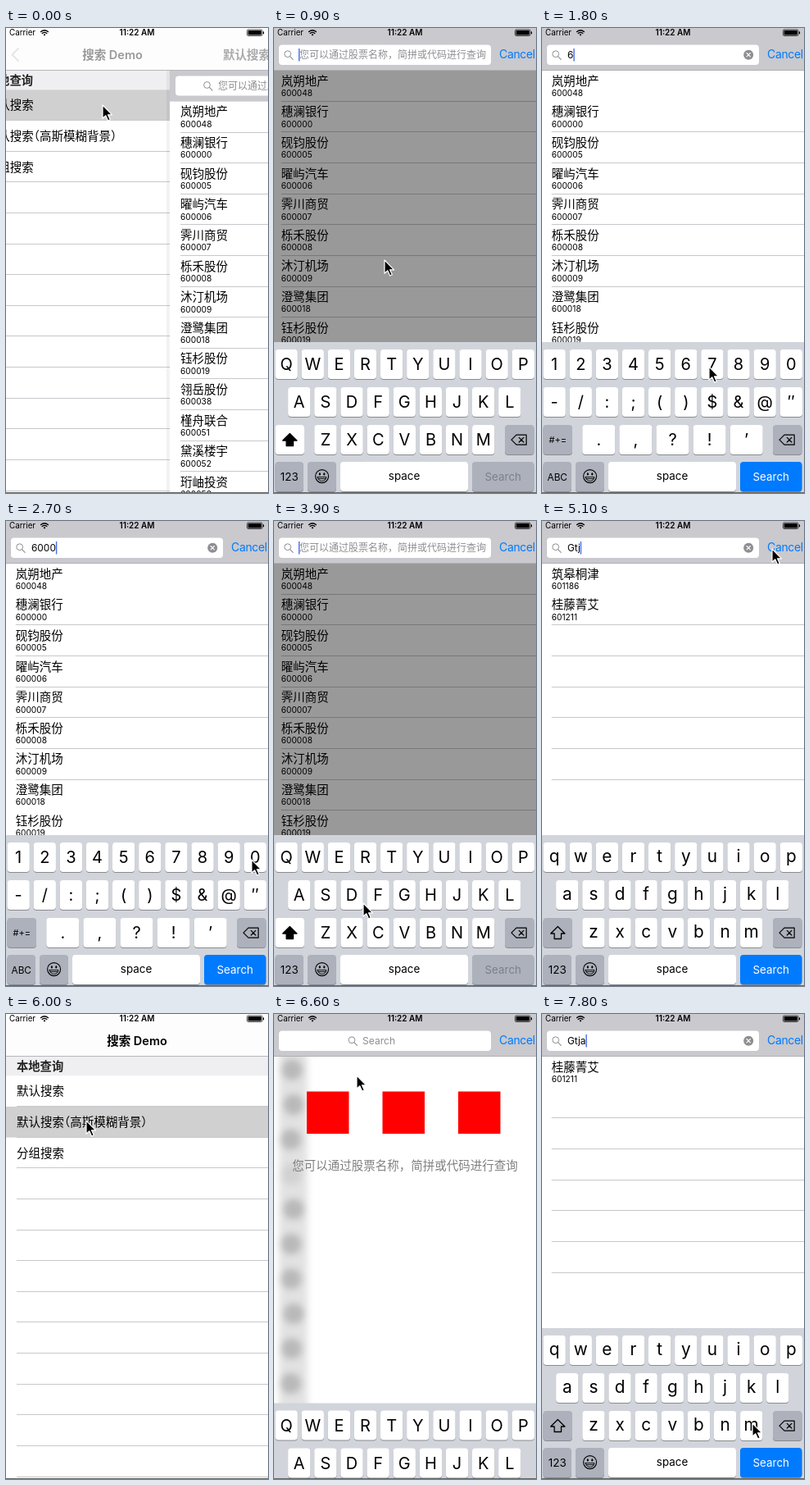
An HTML page for the animation above (8000 ms loop, 320 px wide and 567 px high).

```html
<!DOCTYPE html>
<html lang="zh-CN">
<head>
<meta charset="utf-8">
<title>搜索 Demo</title>
<style>
html, body { margin: 0; width: 100%; height: 100%; overflow: hidden; background: #fff; }
svg { display: block; width: 100vw; height: 100vh; font-family: Inter, "Noto Sans CJK SC", "Noto Sans CJK", sans-serif; }
text { white-space: pre; }
.tight { font-feature-settings: "halt"; }
</style>
</head>
<body>
<svg id="stage" viewBox="0 0 320 567"></svg>
<script>
const STEP = 300, LOOP = 8000, ROW = 37.62;
const BAR = '#c9c9ce', LINE = '#c8c7cc', BLUE = '#007aff', GREY = '#8e8e93', FN = '#acb1bb';
const HINT = '您可以通过股票名称，简拼或代码进行查询';

const stocks = [
  ['岚朔地产', 600048], ['穗澜银行', 600000], ['砚钧股份', 600005], ['曜屿汽车', 600006],
  ['霁川商贸', 600007], ['栎禾股份', 600008], ['沐汀机场', 600009], ['澄鹭集团', 600018],
  ['钰杉股份', 600019], ['翎岳股份', 600038], ['槿舟联合', 600051], ['黛溪楼宇', 600052],
  ['珩岫投资', 600053]
];
const matches = [['筑皋桐津', 601186], ['桂藤菁艾', 601211]];
const menuItems = ['默认搜索', '默认搜索（高斯模糊背景）', '分组搜索'];

const rect = (x, y, w, h, fill, more = '') =>
  `<rect x="${x}" y="${y}" width="${w}" height="${h}" fill="${fill}" ${more}/>`;
const text = (s, x, y, size, fill = '#000', more = '') =>
  `<text x="${x}" y="${y}" font-size="${size}" fill="${fill}" ${more}>${s.replace(/&/g, '&amp;')}</text>`;
const path = (d, stroke, width = 1, fill = 'none') =>
  `<path d="${d}" fill="${fill}" stroke="${stroke}" stroke-width="${width}" stroke-linejoin="round" stroke-linecap="round"/>`;
const move = (x, y, body) => `<g transform="translate(${x} ${y})">${body}</g>`;
// Hairline on whole pixels, just above the given row edge
const rule = (x, edge) => rect(x, Math.floor(edge - .3), 320 - x, 1, LINE);
const MID = 'text-anchor="middle"';

function statusBar() {
  return text('Carrier', 4, 9.3, 9.8) +
    path('M42.6 4.6Q47 .8 51.4 4.6M44.2 6.6Q47 4.2 49.8 6.6', '#000', 1.3) +
    '<circle cx="47" cy="8.3" r="1.1"/>' +
    text('11:22 AM', 160, 9.3, 10, '#000', MID + ' font-weight="600"') +
    rect(294.5, 2, 18.5, 7.5, 'none', 'rx="1.5" stroke="#000" stroke-width=".7"') +
    rect(295.6, 3.1, 16.3, 5.3, '#000', 'rx=".6"') + rect(313.8, 4.3, 1.3, 3, '#000', 'rx=".6"');
}

const lens = (x, y) => `<circle cx="${x}" cy="${y}" r="3.9" fill="none" stroke="${GREY}"/>` +
  path(`M${x + 2.9} ${y + 2.9}l3.6 3.8`, GREY, 1.1);

const navBar = () => rect(0, 0, 320, 52, '#fdfdfd') + rect(0, 51, 320, 1, '#b8b8bb');

function navTitle(s, x, fill) {
  return text(s, x, 38, 14.5, fill, MID + ' font-weight="600"');
}

const chevron = color => path('M15 25l-7.5 7.5l7.5 7.5', color, 2);

function stockRows(list, x, top, lines = true) {
  return list.map(([name, code], i) => {
    const y = top + i * ROW;
    return text(name, x, y + 17.7, 14.5) + text(String(code), x, y + 31.1, 10.2) +
      (lines ? rule(x, y + ROW) : '');
  }).join('');
}

function menuPage(dx, picked) {
  let s = rect(0, 52, 320, 515, '#fff') + rect(0, 52, 320, 23.3, '#efeff2') +
    text('本地查询', 13, 69, 14.3, '#222', 'font-weight="600"');
  for (let i = 0; i < 13; i++) {
    const y = 75.3 + i * ROW;
    if (i === picked) s += rect(0, y, 320, ROW, '#d0d0d1');
    if (menuItems[i]) s += text(menuItems[i], 13, y + 24, 14.5, '#000', 'class="tight"');
    s += rule(13, y + ROW);
  }
  return move(dx, 0, s);
}

function listPage(dx) {
  return move(dx, 0, rect(0, 52, 320, 515, '#fff') + stockRows(stocks, 13, 89.7) +
    rect(0, 52, 320, 37.6, BAR) + rect(7, 58.5, 306, 24, '#fff', 'rx="4"') +
    lens(45.5, 69.5) + text(HINT, 59, 74.6, 12, GREY));
}

function searchBar({ typed = '', hint = HINT, centered }) {
  let s = rect(0, 0, 320, 52, BAR) + rect(0, 51, 320, 1, '#b0b0b4') +
    rect(6, 20.5, 259, 24.5, '#fff', 'rx="4"') + text('Cancel', 275, 37.4, 14, BLUE, 'letter-spacing="-.35"');
  if (centered) return s + lens(95, 31.7) + text(hint, 108, 37, 12.1, GREY);
  s += lens(16.7, 31.7) + rect(30, 25, 1.4, 15.5, '#426bf2', 'id="caret"');
  if (!typed) return s + text(hint, 31, 37, 12, GREY);
  return s + text(typed, 31, 37, 11.9, '#000', 'id="typed"') +
    `<circle cx="252.2" cy="32.7" r="6" fill="${GREY}"/>` + path('M250 30.5l4.4 4.4m0-4.4l-4.4 4.4', '#fff', 1.1);
}

function key(x, y, w, label = '', size = 20, fill = '#fff', ink = '#000', drop = 7.2) {
  return rect(x, y + 1, w, 36, '#898b8f', 'rx="4"') + rect(x, y, w, 36, fill, 'rx="4"') +
    text(label, x + w / 2, y + 18 + drop, size, ink, MID);
}

function keyRow(chars, x, y, w = 27.3, pitch = 32.13) {
  return [...chars].map((c, i) => {
    const low = /[a-z]/.test(c);
    return key(x + i * pitch, y, w, c, low ? 20.8 : 20, '#fff', '#000', low ? 5.5 : 7.2);
  }).join('');
}

function smiley(x, y) {
  return move(x, y, '<circle r="8" fill="none" stroke="#000" stroke-width="1.1"/>' +
    '<ellipse cx="-2.7" cy="-2.7" rx="1.1" ry="1.6"/><ellipse cx="2.7" cy="-2.7" rx="1.1" ry="1.6"/>' +
    path('M-5.4 1H5.4Q4.2 5.8 0 5.8T-5.4 1Z', '#000', .9) + path('M-4.6 3H4.6', '#000', .9));
}

function keyboard(mode, ready, dy = 0) {
  const num = mode === 'num', up = mode === 'up';
  const cased = s => up ? s : s.toLowerCase();
  let s = rect(0, 383, 320, 184, '#d1d5db');
  if (num) {
    s += keyRow('1234567890', 1.5, 392) + keyRow('-/:;()$&@″', 1.5, 438) +
      key(1.5, 484, 35.5, '#+=', 11, FN, '#000', 4) + keyRow('.,?!’', 49.3, 484, 40, 45.1);
  } else {
    s += keyRow(cased('QWERTYUIOP'), 1.5, 392) + keyRow(cased('ASDFGHJKL'), 17.1, 438) +
      key(1.5, 484, 35.5, '', 1, up ? '#fff' : FN) + keyRow(cased('ZXCVBNM'), 49.3, 484) +
      path('M19.3 494.5l8.6 8.5h-4.4v6.5h-8.4v-6.5h-4.4z', '#000', 1.3, up ? '#000' : 'none');
  }
  s += key(282, 484, 35.5, '', 1, FN) +
    path('M290 502.2l6-6h12.2v12H296zM299.3 499.4l5.6 5.6m0-5.6l-5.6 5.6', '#000', 1.2) +
    key(1.5, 529, 34.5, num ? 'ABC' : '123', num ? 11.8 : 13.4, FN, '#000', 5) +
    key(41, 529, 35, '', 1, FN) + smiley(58.6, 546.6) +
    key(81, 529, 156, 'space', 13.4, '#fff', '#000', 4.2) +
    key(242, 529, 75.5, 'Search', 13.4, ready ? BLUE : FN, ready ? '#fff' : '#7c8087', 4.5);
  return move(0, dy, s);
}

function push(shift) {
  return menuPage(-.31 * (320 - shift), 0) +
    rect(shift - 4, 52, 4, 515, '#000', 'opacity=".05"') + listPage(shift) +
    navBar() + navTitle('搜索 Demo', 130, '#999') + navTitle('默认搜索', shift + 94, '#aaa') + chevron('#e6e6e8');
}

function blurPage() {
  let s = '<filter id="soft" x="-100%" y="-20%" width="300%" height="140%"><feGaussianBlur stdDeviation="4.5"/></filter>' +
    rect(0, 52, 320, 515, '#fff') + '<g filter="url(#soft)">' + rect(6, 40, 35, 527, '#e2e2e2');
  for (let i = 0; i < 12; i++)
    s += `<circle cx="${22 + 2 * Math.sin(i * 2)}" cy="${68 + i * 42.5}" r="13" fill="${i === 3 ? '#d2d2d2' : '#b9b9b9'}"/>`;
  s += '</g>';
  for (const x of [40, 132.5, 225]) s += rect(x, 94.5, 51.5, 51.5, '#f00');
  return s + text(HINT, 160, 189.5, 14.5, '#808080', MID);
}

const screens = {
  push: () => push(200),
  list: o => listPage(0) + navBar() + navTitle(o.title || '默认搜索', 160, '#000') + chevron(BLUE),
  menu: o => menuPage(0, o.picked) + navBar() + navTitle('搜索 Demo', 160, '#000'),
  dim: o => rect(0, 52, 320, 515, '#fff') + stockRows(stocks.slice(0, 9), 8.7, 52) +
    rect(0, 52, 320, 515, '#000', 'opacity=".4"') + searchBar(o) + keyboard(o.keys || 'up'),
  blur: o => blurPage() + searchBar(o) + keyboard('up', false, o.dy),
  found(o) {
    let s = rect(0, 52, 320, 515, '#fff');
    for (let i = 2; i < 8; i++) s += rule(11.7, 52 + i * ROW);
    return s + stockRows(o.list || stocks.slice(0, 9), 11.7, 52, false) +
      searchBar(o) + keyboard(o.keys || 'low', true);
  }
};

// One entry per step: screen, pointer x, pointer y, options
const num = typed => ({ typed, keys: 'num' });
const gone = { hint: 'Search' };
const steps = [
  ['push', 118, 94], ['list', 128, 74], ['list', 128, 74],
  ['dim', 135, 283], ['dim', 20, 541], ['dim', 165, 412, { keys: 'num' }],
  ['found', 204, 413, num('6')], ['found', 301, 412, num('60')], ['found', 302, 411, num('600')],
  ['found', 300, 413, num('6000')], ['found', 262, 250, num('6000')],
  ['dim', 252, 34, { keys: 'num' }], ['dim', 20, 543], ['dim', 109, 466],
  ['found', 158, 457, { typed: 'G', list: matches }], ['found', 144, 411, { typed: 'Gt', list: matches }],
  ['found', 223, 457, { typed: 'Gtj', list: matches }], ['found', 281, 34, { typed: 'Gtj', list: matches }],
  ['list', 180, 36], ['menu', 14, 34], ['menu', 98, 130, { picked: 1 }],
  ['list', 101, 75], ['blur', 101, 75, { centered: true, hint: 'Search', dy: 91.5 }],
  ['blur', 150, 330, gone],
  ['found', 158, 457, { typed: 'G', list: matches }], ['found', 223, 457, { typed: 'Gtj', list: matches }],
  ['found', 257, 499, { typed: 'Gtja', list: matches.slice(1) }]
];

const stage = document.getElementById('stage');
let shown = -1;

function draw(now) {
  const i = Math.floor(now % LOOP / STEP);
  if (i !== shown) {
    const [name, x, y, opts = {}] = steps[shown = i];
    stage.innerHTML = screens[name](opts) + statusBar() + rect(0, 566, 320, 1, '#666') +
      move(x, y, path('M0 0V16.2L3.8 12.8L6.6 19L9.3 17.8L6.5 11.8H11.6Z', '#fff', 1.2, '#000'));
    const typed = document.getElementById('typed');
    if (typed) document.getElementById('caret').setAttribute('x', 31 + typed.getComputedTextLength());
  }
}

const start = performance.now();
(function tick() {
  draw(performance.now() - start);
  requestAnimationFrame(tick);
})();
</script>
</body>
</html>
```
